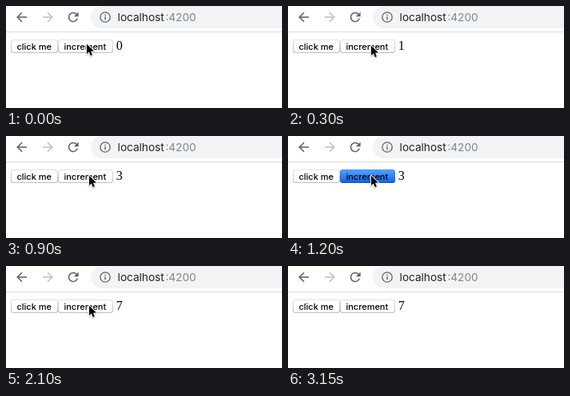
Recreate the animation shown at these times as an HTML page with a canvas. Size 345x128 px, loop 3450 ms.

```html
<!DOCTYPE html>
<html lang="en">
<head>
<meta charset="utf-8">
<title>Counter demo</title>
<style>
  html, body { margin: 0; width: 100%; height: 100%; overflow: hidden; background: #fff; }
  canvas { display: block; width: 345px; height: 128px; }
</style>
</head>
<body>
<canvas id="stage"></canvas>
<script>
const W = 345, H = 128, LOOP = 3450;
const canvas = document.getElementById('stage');
const ctx = canvas.getContext('2d');
const dpr = window.devicePixelRatio || 1;
canvas.width = W * dpr;
canvas.height = H * dpr;

// Each track lists [start time, value...]; values hold until the next entry.
const counts = [[0, 0], [300, 1], [750, 2], [900, 3], [1350, 4], [1500, 5], [1800, 6], [2100, 7]];
const presses = [[0, false], [150, true], [300, false], [600, true], [750, false], [1200, true], [1350, false]];
const pointer = [[0, 99, 46.5], [150, 102, 48.5], [2700, 141, 57.5], [2850, 294, 124.5], [3150, 400, 200]];

function at(track, t) {
  let now = track[0];
  for (const step of track) if (step[0] <= t) now = step;
  return now;
}

function text(str, x, y, font, color) {
  ctx.font = font;
  ctx.fillStyle = color;
  ctx.fillText(str, x, y);
}

function line(points, color, width) {
  ctx.beginPath();
  points.forEach(([x, y]) => ctx.lineTo(x, y));
  ctx.strokeStyle = color;
  ctx.lineWidth = width;
  ctx.stroke();
}

function roundBox(x, y, w, h, r, fill) {
  ctx.beginPath();
  ctx.moveTo(x + r, y);
  ctx.arcTo(x + w, y, x + w, y + h, r);
  ctx.arcTo(x + w, y + h, x, y + h, r);
  ctx.arcTo(x, y + h, x, y, r);
  ctx.arcTo(x, y, x + w, y, r);
  ctx.closePath();
  ctx.fillStyle = fill;
  ctx.fill();
}

function fade(y0, y1, from, to) {
  const g = ctx.createLinearGradient(0, y0, 0, y1);
  g.addColorStop(0, from);
  g.addColorStop(1, to);
  return g;
}

function arrow(cx, cy, dir, color) {
  line([[cx - 6 * dir, cy], [cx + 5.6 * dir, cy]], color, 1.6);
  line([[cx, cy - 5.8], [cx + 5.8 * dir, cy], [cx, cy + 5.8]], color, 1.6);
}

function reload(cx, cy) {
  ctx.beginPath();
  ctx.arc(cx, cy, 5.5, 0.3, Math.PI * 1.76);
  ctx.strokeStyle = '#5f6368';
  ctx.lineWidth = 1.6;
  ctx.stroke();
  ctx.beginPath();
  ctx.moveTo(cx + 6.6, cy - 6.6);
  ctx.lineTo(cx + 6.6, cy - 0.8);
  ctx.lineTo(cx + 0.8, cy - 0.8);
  ctx.fillStyle = '#5f6368';
  ctx.fill();
}

function toolbar() {
  arrow(20, 14, -1, '#5f6368');
  arrow(52, 14, 1, '#bfc1c4');
  reload(84, 14);
  roundBox(106, 0, 300, 28, 14, '#f1f3f4');

  ctx.beginPath();
  ctx.arc(124, 14, 6.2, 0, Math.PI * 2);
  ctx.strokeStyle = '#5f6368';
  ctx.lineWidth = 1.3;
  ctx.stroke();
  ctx.fillStyle = '#5f6368';
  ctx.fillRect(123.3, 10.7, 1.4, 1.4);
  ctx.fillRect(123.3, 13.2, 1.4, 4.1);

  const font = '13.6px Inter, Roboto, sans-serif';
  text('localhost', 139.6, 19, font, '#202124');
  text(':4200', 199.4, 19, font, '#80868b');
  ctx.fillStyle = '#d9dbdd';
  ctx.fillRect(0, 32, W, 1);
}

function button(x, w, label, pressed) {
  const y = 42, h = 17;
  roundBox(x, y, w, h, 3.5, pressed ? fade(y, y + h, '#4a94f5', '#0b50c8') : fade(y, y + h, '#e4e4e4', '#bdbdbd'));
  roundBox(x + 1, y + 1, w - 2, h - 2, 3, pressed ? fade(y, y + h, '#56a3fb', '#0c62ee') : '#fff');
  text(label, x + 7.4, 55, '500 11px Inter, Roboto, sans-serif', '#000');
}

function cursor(x, y) {
  ctx.save();
  ctx.translate(x + 1.9, y + 1.2);
  ctx.scale(0.92, 0.92);
  ctx.beginPath();
  [[0, 0], [0, 13.6], [3.1, 10.7], [5.3, 15.8], [7.6, 14.8], [5.5, 9.9], [9.8, 9.6]]
    .forEach(([px, py]) => ctx.lineTo(px, py));
  ctx.closePath();
  ctx.lineJoin = 'round';
  ctx.shadowColor = 'rgba(0,0,0,0.35)';
  ctx.shadowBlur = 1.5 * dpr;
  ctx.shadowOffsetY = 0.6 * dpr;
  ctx.strokeStyle = '#fff';
  ctx.lineWidth = 2;
  ctx.stroke();
  ctx.shadowColor = 'transparent';
  ctx.fillStyle = '#000';
  ctx.fill();
  ctx.restore();
}

function draw() {
  const t = performance.now() % LOOP;
  ctx.setTransform(dpr, 0, 0, dpr, 0, 0);
  ctx.fillStyle = '#fff';
  ctx.fillRect(0, 0, W, H);
  toolbar();
  button(6, 59, 'click me', false);
  button(65, 69, 'increment', at(presses, t)[1]);
  text(at(counts, t)[1], 137.8, 55, '16px "Liberation Serif", Times, serif', '#000');
  const [, x, y] = at(pointer, t);
  cursor(x, y);
  requestAnimationFrame(draw);
}
draw();
</script>
</body>
</html>
```
